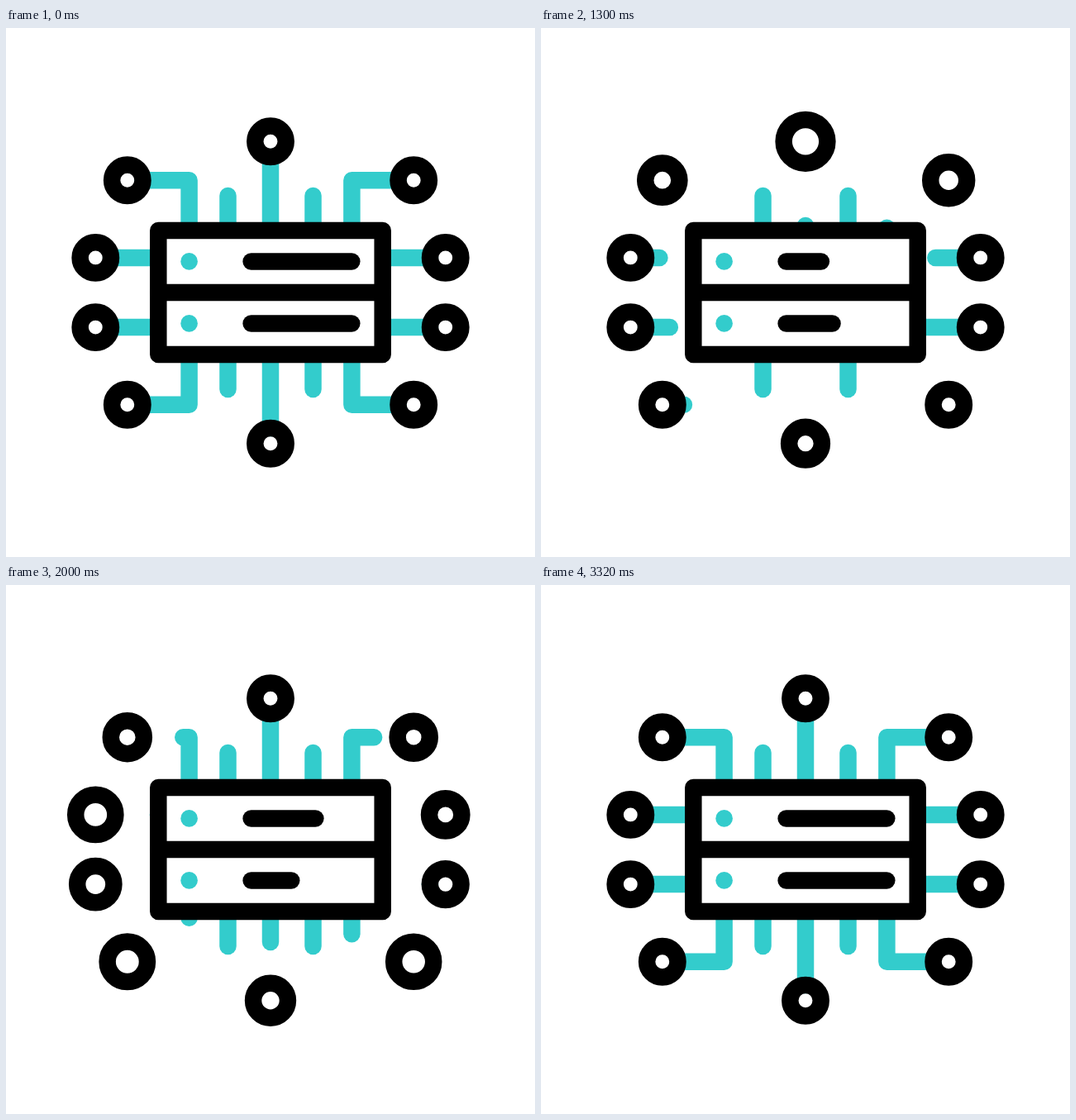
Recreate the animation shown at these times as an HTML page with a canvas. Size 640x640 px, loop 3600 ms.

```html
<!DOCTYPE html>
<html lang="en">
<head>
<meta charset="utf-8">
<title>Server network</title>
<style>
html, body { margin: 0; width: 100%; height: 100%; overflow: hidden; background: #fff; }
canvas { display: block; width: 100vw; height: 100vh; }
</style>
</head>
<body>
<canvas id="stage" width="640" height="640"></canvas>
<script>
const ctx = document.getElementById('stage').getContext('2d');
const LOOP = 3600, TEAL = '#33cccc', BLACK = '#000';
const RING = 18.7, WIDTH = 20.5;

// ring: x, y, bump start, peak, end, extra radius
// line: points from server to ring; out: drains away; back: grows again
const nodes = [
  { ring: [320, 137.3, 730, 1380, 1850, 8], line: [320, 245, 320, 156], out: [0, 560], back: [1130, 2200] },
  { ring: [493.2, 184.2, 1000, 1580, 2130, 6.2], line: [418.4, 245, 418.4, 184.2, 474.5, 184.2], out: [0, 940], back: [1180, 2400] },
  { ring: [146.8, 184.2, 1000, 1690, 2170, 4.7], line: [221.6, 245, 221.6, 184.2, 165.5, 184.2], out: [100, 950], back: [1340, 2530] },
  { ring: [320, 502.7, 1180, 1600, 2290, 5.9], line: [320, 395, 320, 484], out: [297, 1197], back: [1545, 2575] },
  { ring: [493.2, 455.8, 1400, 1960, 2560, 5.4], line: [418.4, 395, 418.4, 455.8, 474.5, 455.8], out: [490, 1290], back: [1623, 2828] },
  { ring: [146.8, 455.8, 1420, 1980, 2600, 5.5], line: [221.6, 395, 221.6, 455.8, 165.5, 455.8], out: [590, 1430], back: [1838, 2882] },
  { ring: [108.3, 277.9, 1705, 2170, 2690, 7.7], line: [184.3, 277.9, 127, 277.9], out: [758, 1598], back: [1954, 3004] },
  { ring: [108.3, 362.1, 1760, 2200, 2665, 6], line: [184.3, 362.1, 127, 362.1], out: [883, 1723], back: [2090, 3140] },
  { ring: [531.7, 277.9, 1910, 2290, 2730, 6.8], line: [455.7, 277.9, 513, 277.9], out: [970, 1765], back: [2250, 3200] },
  { ring: [531.7, 362.1, 1940, 2500, 2900, 5.8], line: [455.7, 362.1, 513, 362.1], out: [1216, 2016], back: [2350, 3200] }
];
const bars = [
  { y: 282.4, out: [0, 1400], back: [1510, 2555] },
  { y: 357.4, out: [415, 1635], back: [1810, 2820] }
];

function ease(t, [start, end]) {
  const x = Math.min(1, Math.max(0, (t - start) / (end - start)));
  return x * x * (3 - 2 * x);
}

function trace(pts) {
  ctx.beginPath();
  for (let i = 0; i < pts.length; i += 2) ctx.lineTo(pts[i], pts[i + 1]);
}

function stroke(color, pts) {
  ctx.strokeStyle = color;
  trace(pts);
  ctx.stroke();
}

function circle(x, y, r) {
  ctx.beginPath();
  ctx.arc(x, y, r, 0, 2 * Math.PI);
}

// Strokes the part of a polyline between fractions from and to
function trimmed(pts, from, to) {
  if (to - from < 0.001) return;
  let len = 0;
  for (let i = 2; i < pts.length; i += 2)
    len += Math.hypot(pts[i] - pts[i - 2], pts[i + 1] - pts[i - 1]);
  ctx.setLineDash([(to - from) * len, 2 * len]);
  ctx.lineDashOffset = -from * len;
  stroke(TEAL, pts);
  ctx.setLineDash([]);
}

function drawServer(t) {
  ctx.strokeStyle = BLACK;
  ctx.fillStyle = '#fff';
  ctx.beginPath();
  ctx.rect(184.3, 245, 271.4, 150);
  ctx.fill();
  ctx.stroke();
  stroke(BLACK, [184.3, 320, 455.7, 320]);
  for (const { y, out, back } of bars) {
    const right = 418.3 - 80.6 * (ease(t, out) - ease(t, back));
    stroke(BLACK, [296.6, y, right, y]);
    ctx.fillStyle = TEAL;
    circle(221.6, y, 10.3);
    ctx.fill();
  }
}

function draw(t) {
  ctx.clearRect(0, 0, 640, 640);
  ctx.lineWidth = WIDTH;
  ctx.lineCap = ctx.lineJoin = 'round';

  for (const x of [268.5, 371.5]) stroke(TEAL, [x, 203, x, 437]);
  for (const { line, out, back } of nodes) {
    const gone = ease(t, out);
    if (gone < 1) trimmed(line, gone, 1);
    else trimmed(line, 0, ease(t, back));
  }

  drawServer(t);

  for (const { ring: [x, y, start, peak, end, grow] } of nodes) {
    const bump = ease(t, [start, peak]) - ease(t, [peak, end]);
    ctx.strokeStyle = BLACK;
    circle(x, y, RING + grow * bump);
    ctx.stroke();
  }
}

function frame() {
  draw(performance.now() % LOOP);
  requestAnimationFrame(frame);
}
frame();
</script>
</body>
</html>
```
